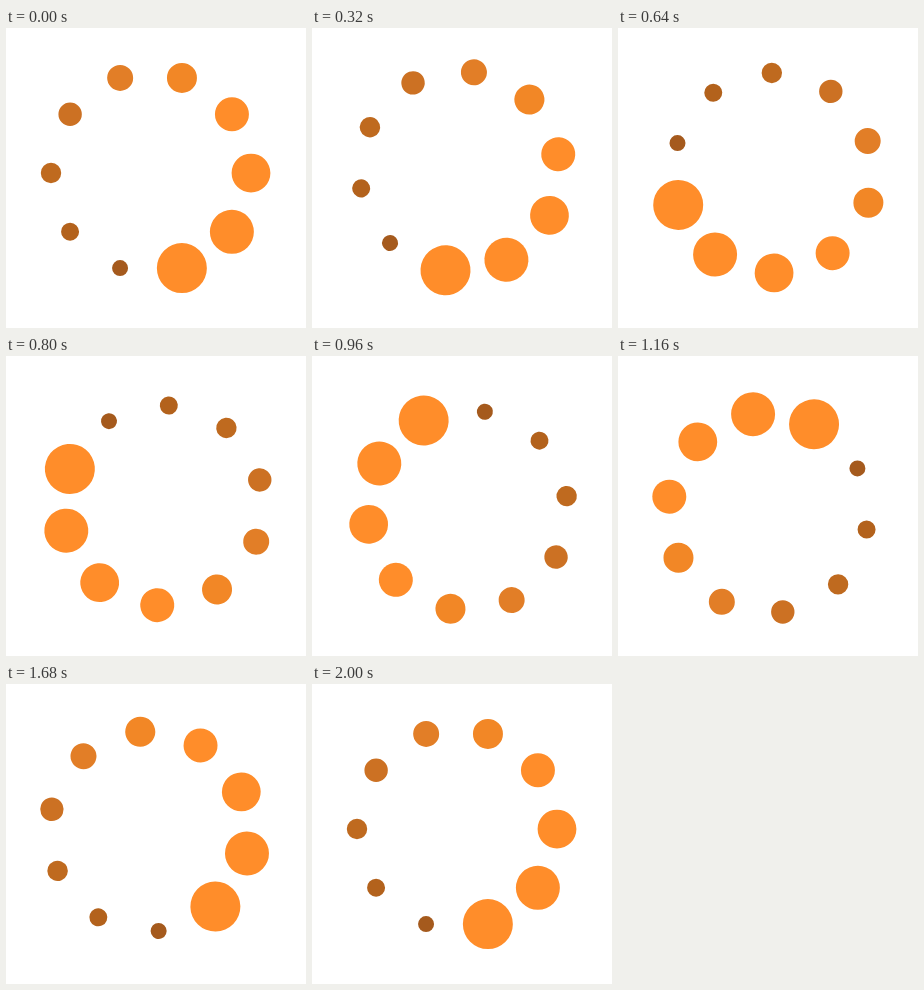
An HTML page for the animation above (2.04 s loop, 300 px wide and 300 px high).

```html
<!DOCTYPE html>
<html lang="en">
<head>
<meta charset="utf-8">
<title>Loading ring</title>
<style>
  html, body { margin: 0; width: 100%; height: 100%; overflow: hidden; background: #fff; }
  svg { display: block; width: 100vw; height: 100vh; }
</style>
</head>
<body>
<svg viewBox="0 0 300 300"><g id="ring"></g></svg>
<script>
  const LOOP = 2040, STEP = 40, TURN = 2000, LEAD = 10;
  const ring = document.getElementById('ring');

  // Radius and colour, from the leading dot to the tail
  const dots = [
    [25, '#ff8d2a'], [22, '#ff8d2a'], [19.4, '#ff8d2a'], [17, '#ff8d2a'], [15, '#f28726'],
    [13, '#e27e27'], [11.7, '#cc7123'], [10.2, '#bf6a1f'], [9, '#b3621c'], [8, '#a55a1d']
  ];

  dots.forEach(([r, fill], i) => {
    const a = (72 - 36 * i) * Math.PI / 180;
    const dot = document.createElementNS('http://www.w3.org/2000/svg', 'circle');
    const attrs = { cx: 145 + 100 * Math.cos(a), cy: 145 + 100 * Math.sin(a), r, fill };
    for (const k in attrs) dot.setAttribute(k, attrs[k]);
    ring.append(dot);
  });

  const ease = s => s * s * (3 - 2 * s);
  const start = performance.now();

  function draw() {
    // The small bias keeps clock rounding from landing on the previous step
    const t = Math.floor(((performance.now() - start + 3) % LOOP) / STEP) * STEP;
    const s = ((t + LEAD) % TURN) / TURN;
    // The ring's centre is off the pivot, so it wobbles as it turns
    ring.setAttribute('transform', `rotate(${360 * ease(s)} 150 150)`);
    requestAnimationFrame(draw);
  }
  draw();
</script>
</body>
</html>
```
